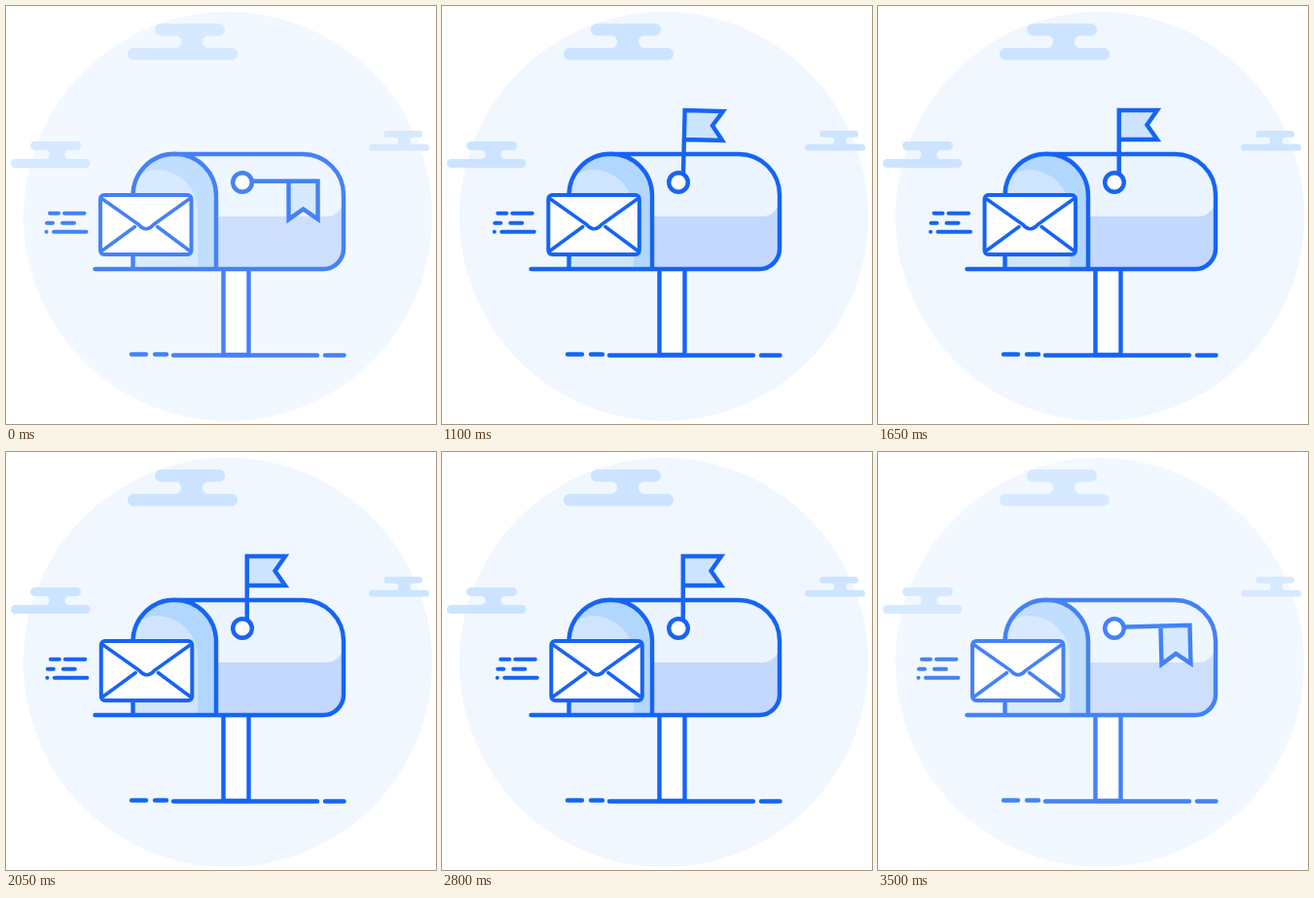
Write an HTML page that moves like this. It is 442 px wide and 429 px high and loops after 3.55 s.

```html
<!DOCTYPE html>
<html lang="en">
<head>
<meta charset="utf-8">
<title>Mailbox</title>
<style>
  html, body { margin: 0; width: 100%; height: 100%; overflow: hidden; background: #fff; }
  svg { display: block; width: 100%; height: 100%; }
  .line { stroke: #1664f5; stroke-width: 4.4; stroke-linecap: round; }
  .cloud { fill: #cce4ff; }
</style>
</head>
<body>
<svg viewBox="0 0 442 429" fill="none">
  <defs>
    <g id="cloud">
      <rect x="28" width="72" height="12.5" rx="6.2"/>
      <rect y="25" width="113" height="12.5" rx="6.2"/>
      <path d="M48.500 12a6.500 6.500 0 0 1 0 13.200H83.500a6.500 6.500 0 0 1 0-13.200z"/>
    </g>
  </defs>
  <g id="scene">
    <circle cx="228" cy="216" r="210" fill="#f0f7ff"/>
    <g class="cloud">
      <use href="#cloud" transform="translate(125 18)"/>
      <use href="#cloud" transform="translate(5 139) scale(.72)"/>
      <use href="#cloud" transform="translate(373 128) scale(.549)"/>
    </g>

    <!-- post and ground -->
    <path class="line" fill="#fff" d="M223.500 271V358H249.500V271"/>
    <path class="line" d="M129 357.500H144M153 357.500H165M172 358.500H320M328 358.500H347.500"/>

    <!-- box -->
    <path fill="#c3d8fe" d="M216 200H347V249A21 21 0 0 1 326 270H216z"/>
    <path fill="#ebf4ff" d="M174 152H305A42 42 0 0 1 347 194V198A18 18 0 0 1 329 216H216z"/>
    <path fill="#b2d7ff" d="M130.500 270V194.500A42.750 42.750 0 0 1 216 194.500V270z"/>
    <path fill="#cfe5ff" d="M131 270V193L136 175Q145 168 155 168A42 42 0 0 1 197 210V270z"/>
    <path class="line" d="M130.500 270V194.500A42.750 42.750 0 0 1 216 194.500V270M173 152H305A42 42 0 0 1 347 194V249A21 21 0 0 1 326 270H91.500"/>

    <!-- flag -->
    <g id="flag" class="line">
      <path fill="#cce4ff" stroke-linecap="butt" d="M247.750 180V107H287L276.500 122L287 137H247.750"/>
    </g>
    <circle class="line" cx="243" cy="181" r="9.800" fill="#fff"/>

    <!-- letter -->
    <g id="letter" class="line" style="stroke-width:4">
      <path d="M45 212.800H54M60 212.800H80.500M42 222.800H48M58 222.800H70M41.500 231.800h.1M49 231.800H82.500"/>
      <rect x="97" y="194" width="93.500" height="61" rx="4" fill="#fff"/>
      <path stroke-width="3.500" style="stroke-width:3.500" d="M99 198L136 224Q144 233.500 152 224L188.500 198M99 251L132.500 226.500M188.500 251L155.500 226.500"/>
    </g>
  </g>
</svg>
<script>
  const LOOP = 3550, STEP = 50, ON = 750, OFF = 3150;
  const scene = document.getElementById('scene');
  const flag = document.getElementById('flag');
  const letter = document.getElementById('letter');

  // cubic-bezier(.25, .1, .25, 1)
  function ease(x) {
    if (x <= 0) return 0;
    if (x >= 1) return 1;
    const curve = (s, a, b) => 3 * a * s * (1 - s) ** 2 + 3 * b * s * s * (1 - s) + s ** 3;
    let lo = 0, hi = 1;
    for (let i = 0; i < 24; i++) {
      const mid = (lo + hi) / 2;
      if (curve(mid, .25, .25) < x) lo = mid; else hi = mid;
    }
    return curve(lo, .1, 1);
  }

  // 0 at rest, 1 while active, with eased changes at ON and OFF
  function active(t, length) {
    const since = (t - OFF + LOOP) % LOOP;
    return t >= ON && t < OFF ? ease((t - ON) / length) : 1 - ease(since / length);
  }

  function draw(now) {
    const t = Math.floor((now % LOOP) / STEP) * STEP;
    const swing = t > 775 && t < OFF ? 11 * (1 - Math.cos((t - 777) / 1200 * 2 * Math.PI)) : 0;
    scene.setAttribute('opacity', .8 + .2 * active(t, 300));
    flag.setAttribute('transform', `rotate(${90 * (1 - active(t, 420))} 247.75 179.75)`);
    letter.setAttribute('transform', `translate(${swing} 0)`);
  }

  const start = performance.now();
  function tick() {
    draw(performance.now() - start);
    requestAnimationFrame(tick);
  }
  tick();
</script>
</body>
</html>
```
